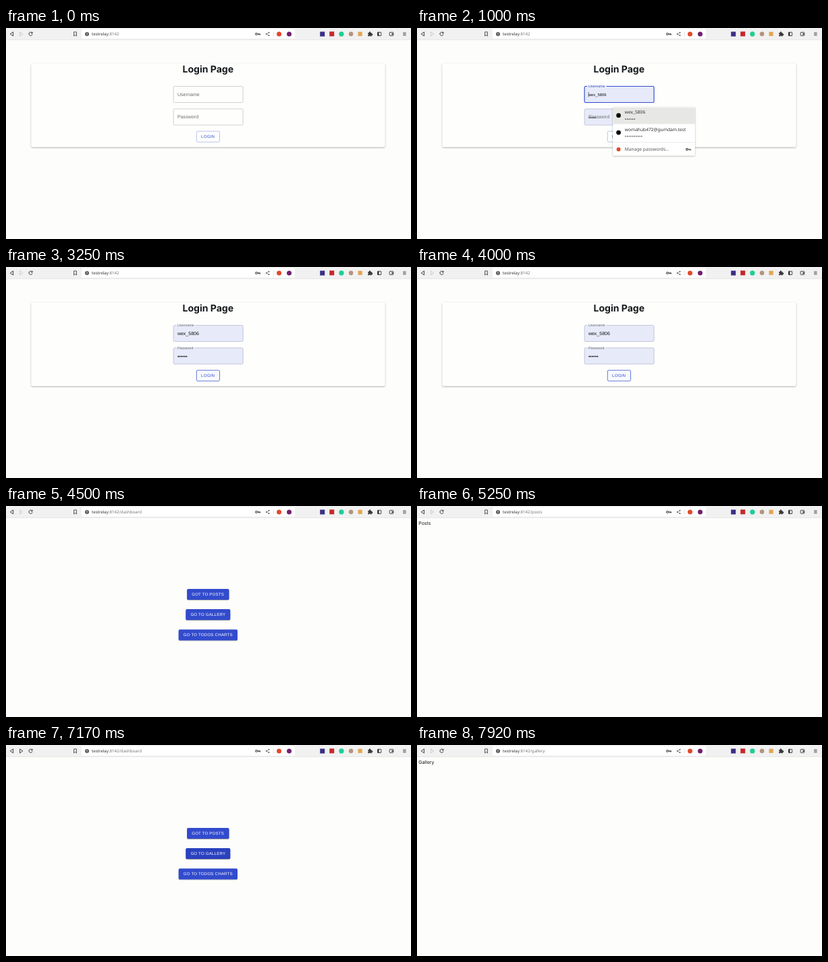
Recreate the animation shown at these times as an HTML page. Size 600x313 px, loop 8 s.

```html
<!DOCTYPE html>
<html lang="en">
<head>
<meta charset="utf-8">
<title>Login walkthrough</title>
<style>
  html, body { margin: 0; width: 100%; height: 100%; overflow: hidden; background: #fdfefc; }
  svg { position: fixed; inset: 0; width: 100%; height: 100%; display: block; }
  text { white-space: pre; text-rendering: geometricPrecision; }
  .ui { font-family: "Liberation Sans", Arial, sans-serif; }
  .chrome { font-family: "Noto Sans", "Open Sans", sans-serif; }
  .page { font-family: Inter, sans-serif; }
</style>
</head>
<body>
<svg id="stage" viewBox="0 0 600 313" preserveAspectRatio="none">
  <defs>
    <filter id="cardShadow" x="-5%" y="-10%" width="110%" height="125%">
      <feDropShadow dx="0" dy=".9" stdDeviation="1" flood-color="#000" flood-opacity=".38"/>
    </filter>
    <filter id="buttonShadow" x="-10%" y="-20%" width="120%" height="160%">
      <feDropShadow dx="0" dy=".9" stdDeviation=".7" flood-color="#000" flood-opacity=".4"/>
    </filter>
    <filter id="menuShadow" x="-10%" y="-10%" width="120%" height="125%">
      <feDropShadow dx="0" dy=".8" stdDeviation="1.1" flood-color="#000" flood-opacity=".35"/>
    </filter>
  </defs>
</svg>
<script>
const LOOP = 8000;
const BLUE = '#304ccd';
const GREY = '#6b6b6b';
const FILL = '#e7eaf9';
const USER = 'wex_5806';
const MAIL = 'womahub472@gumdam.test';
const HOST = 'testrelay', PORT = ':8142';

const stage = document.getElementById('stage');

function add(parent, tag, attrs = {}, content) {
  const el = document.createElementNS('http://www.w3.org/2000/svg', tag);
  set(el, attrs);
  if (content !== undefined) el.textContent = content;
  parent.appendChild(el);
  return el;
}
function set(el, attrs) {
  for (const k in attrs) el.setAttribute(k, attrs[k]);
}
const group = parent => add(parent, 'g');
const rect = (p, x, y, width, height, attrs) => add(p, 'rect', { x, y, width, height, ...attrs });
const dot = (p, cx, cy, r, fill) => add(p, 'circle', { cx, cy, r, fill });
const line = (p, d, stroke = '#333', w = 0.9) =>
  add(p, 'path', { d, fill: 'none', stroke, 'stroke-width': w, 'stroke-linejoin': 'round' });
const text = (p, cls, x, y, size, fill, str, attrs) =>
  add(p, 'text', { class: cls, x, y, 'font-size': size, fill, ...attrs }, str);
const show = (el, on) => el.setAttribute('visibility', on ? 'visible' : 'hidden');

const within = (t, a, b) => t >= a && t < b;
const ramp = (t, a, b) => Math.min(1, Math.max(0, (t - a) / (b - a)));
const ease = p => p * p * (3 - 2 * p);
const mix = (a, b, p) => a + (b - a) * p;
function blend(from, to, p) {
  const part = (c, i) => parseInt(c.slice(i, i + 2), 16);
  return `rgb(${[1, 3, 5].map(i => Math.round(mix(part(from, i), part(to, i), p)))})`;
}

// Key icon shared by the toolbar and the password menu
function keyIcon(p, x, y) {
  add(p, 'circle', { cx: x - 2, cy: y, r: 1.4, fill: 'none', stroke: '#444', 'stroke-width': 1.1 });
  line(p, `M${x - .6} ${y}h4v1.6M${x + 1.6} ${y}v1.5`, '#444', 1.1);
}

function makeToolbar() {
  const g = group(stage);
  rect(g, 0, 0, 600, 17.3, { fill: '#f1f1f1' });
  rect(g, 0, 16.9, 600, .7, { fill: '#dcdcdc' });
  rect(g, 112, 1.8, 316, 13.8, { rx: 1.8, fill: '#ffffff' });

  const backHover = rect(g, 2.8, 2.8, 11.4, 12, { rx: 1.2, fill: '#d3d3d2' });
  line(g, 'M10.6 5.9V11.9L6.2 8.9Z');
  const forward = line(g, 'M20.5 5.9V11.9L24.9 8.9Z');
  line(g, 'M38.7 7.2A2.6 2.6 0 1 0 39.1 9.4M39.1 5.8V7.8H37.1', '#333', 1);
  line(g, 'M100.6 5.9H104.4V12L102.5 10.3L100.6 12Z', '#444', .9);

  dot(g, 120, 8.9, 3, '#5a5a5a');
  line(g, 'M120 7.1V9.4M120 10.1V10.8', '#fff', .8);

  const url = text(g, 'chrome', 127, 11, 6.15, '#777', '');
  add(url, 'tspan', { fill: '#333' }, HOST);
  const tail = add(url, 'tspan', {}, PORT);

  keyIcon(g, 373, 8.9);
  line(g, 'M389.3 6.9L385.9 8.9L389.3 11', '#555', .6);
  [[389.5, 6.8], [385.7, 8.9], [389.5, 11]].forEach(([x, y]) => dot(g, x, y, .95, '#555'));
  line(g, 'M396.3 5.5V12.5', '#ccc', .6);
  dot(g, 404.5, 8.9, 3.5, '#e2492b');
  dot(g, 419.5, 9, 3.5, '#70206f');

  rect(g, 465.2, 5.5, 7, 7, { fill: '#3b2f86' });
  rect(g, 479.2, 5.3, 7, 7, { fill: '#c52a2a' });
  dot(g, 496.9, 8.9, 3.6, '#1fce93');
  dot(g, 511, 8.9, 3.3, '#b5947c');
  rect(g, 521.5, 5.7, 6.2, 6.2, { fill: '#e3a552' });

  add(g, 'path', {
    fill: '#3a3a3a',
    d: 'M536.2 7H538A1.15 1.15 0 1 1 540 7H541.7V8.7A1.15 1.15 0 1 1 541.7 10.8V12.2H539.9A1 1 0 0 0 538 12.2H536.2V10.5A1 1 0 0 0 536.2 8.6Z'
  });
  rect(g, 550.5, 6.3, 5.2, 5.2, { rx: .5, fill: 'none', stroke: '#333', 'stroke-width': .9 });
  rect(g, 550.5, 6.3, 2, 5.2, { fill: '#333' });
  rect(g, 568.2, 6.4, 5.6, 5, { rx: .8, fill: 'none', stroke: '#333', 'stroke-width': .9 });
  rect(g, 571.2, 8.1, 2.8, 1.8, { fill: '#333' });
  line(g, 'M588.2 7H592.6M588.2 8.9H592.6M588.2 10.8H592.6', '#333', .8);

  return (path, canForward, hover) => {
    tail.textContent = PORT + path;
    set(forward, { stroke: canForward ? '#333' : '#c9c9c9' });
    set(backHover, { opacity: hover });
  };
}

// Outlined field whose label floats up into a notch in the border
function makeField(parent, y, label, notch) {
  const g = group(parent);
  const box = rect(g, 248.1, y, 103, 24, { rx: 1.8 });
  const gap = rect(g, 252.2, y - .8, notch, 1.6, {});
  const value = text(g, 'ui', 253.9, y + 14.7, 7.03, '#111', '');
  const name = text(g, 'ui', 253.9, 0, 7.03, GREY, label, { 'letter-spacing': '.009em' });
  return ({ rise, focus, filled, str, preview, color }) => {
    const fill = filled ? FILL : '#fefefd';
    set(box, { fill, stroke: focus ? BLUE : filled ? '#b3b7ca' : '#c2c2c2', 'stroke-width': focus ? 1.15 : .75 });
    set(gap, { fill, width: notch * rise });
    set(name, { y: mix(y + 14.4, y + 1.6, rise), 'font-size': mix(7.03, 5.27, rise), fill: color });
    set(value, { 'font-size': preview ? 5.85 : 7.03 });
    value.textContent = str;
  };
}

function makeLogin() {
  const g = group(stage);
  rect(g, 37.5, 52.5, 524, 124, { rx: 1.8, fill: '#fefefd', filter: 'url(#cardShadow)' });
  text(g, 'page', 299.3, 66.4, 14.06, '#161a1d', 'Login Page', { 'font-weight': 700, 'text-anchor': 'middle' });
  const user = makeField(g, 86.5, 'Username', 28.5);
  const pass = makeField(g, 120, 'Password', 27.5);
  const caret = rect(g, 253.8, 95, .6, 7.4, { fill: '#222' });
  const button = rect(g, 282.3, 153.2, 34.2, 15.9, { rx: 1.8, 'stroke-width': .8 });
  text(g, 'ui', 289.1, 163.3, 6.15, BLUE, 'LOGIN', { 'letter-spacing': '.029em' });

  const menu = group(g);
  rect(menu, 290.2, 117.2, 121.6, 72, { rx: .6, fill: '#fff', filter: 'url(#menuShadow)' });
  const active = rect(menu, 290.2, 117.8, 121.6, 24.6, { fill: '#e7e7e5' });
  [[USER, 6, 127.1], [MAIL, 10, 152.5]].forEach(([name, dots, y]) => {
    dot(menu, 298.6, y + 2.6, 3.4, '#0b0b0b');
    text(menu, 'chrome', 307.7, y, 6.65, '#333', name);
    for (let i = 0; i < dots; i++) dot(menu, 309 + i * 2.65, y + 8.1, .85, '#555');
  });
  rect(menu, 290.2, 169.1, 121.6, .6, { fill: '#dedede' });
  dot(menu, 298.6, 180, 3, '#dc4a30');
  text(menu, 'chrome', 307.7, 182.3, 6.65, '#555', 'Manage passwords…');
  keyIcon(menu, 402, 180);

  return t => {
    const visible = t < 4080;
    show(g, visible);
    const preview = within(t, 1000, 1420);
    const filled = t >= 1000;
    const focus = within(t, 330, 2170);
    user({
      rise: ease(ramp(t, 310, 500)), focus, filled, preview,
      str: filled ? USER : '',
      color: t < 330 ? GREY : blend(BLUE, GREY, ramp(t, 2250, 2500))
    });
    pass({
      rise: ease(ramp(t, 1420, 1600)), focus: false, filled, preview,
      str: filled ? '••••••' : '', color: GREY
    });
    const hover = ease(ramp(t, 1830, 2080));
    set(button, { fill: blend('#fefefd', '#f8f9fe', hover), stroke: blend('#a8b5e4', '#3d58cf', hover) });
    show(caret, visible && within(t, 330, 1420));
    show(menu, visible && within(t, 500, 1420));
    show(active, visible && preview);
  };
}

function makeDashboard() {
  const g = group(stage);
  const button = (x, y, w, label) => {
    const b = rect(g, x, y, w, 15.9, { rx: 1.8, fill: BLUE, filter: 'url(#buttonShadow)' });
    text(g, 'ui', x + 7.1, y + 10.15, 6.15, '#fff', label, { 'letter-spacing': '.029em' });
    return b;
  };
  const posts = button(268.1, 123.1, 62.4, 'GOT TO POSTS');
  const gallery = button(266.3, 153.1, 66, 'GO TO GALLERY');
  button(255.7, 183.3, 87.3, 'GO TO TODOS CHARTS');
  return t => {
    show(g, within(t, 4080, 4830) || within(t, 6250, 7670));
    set(posts, { fill: blend(BLUE, '#2a43bf', within(t, 4500, 4830) ? ramp(t, 4500, 4750) : 0) });
    set(gallery, { fill: blend(BLUE, '#2a43bf', ramp(t, 6920, 7170)) });
  };
}

rect(stage, 0, 0, 600, 313, { fill: '#fdfdfb' });
const toolbar = makeToolbar();
const login = makeLogin();
const dashboard = makeDashboard();
const heading = text(stage, 'page', 2.2, 28, 7.03, '#15181a', '');

function route(t) {
  if (t < 4080) return '';
  if (t < 4830) return '/dashboard';
  if (t < 6250) return '/posts';
  return t < 7670 ? '/dashboard' : '/gallery';
}

function draw(t) {
  const path = route(t);
  const hover = t < 6170 ? 0 : 1 - ramp(t, 6670, 6830);
  toolbar(path, within(t, 6250, 7670), hover);
  login(t);
  dashboard(t);
  heading.textContent = { '/posts': 'Posts', '/gallery': 'Gallery' }[path] || '';
}

const start = performance.now();
function tick() {
  draw((performance.now() - start) % LOOP);
  requestAnimationFrame(tick);
}
tick();
</script>
</body>
</html>
```
